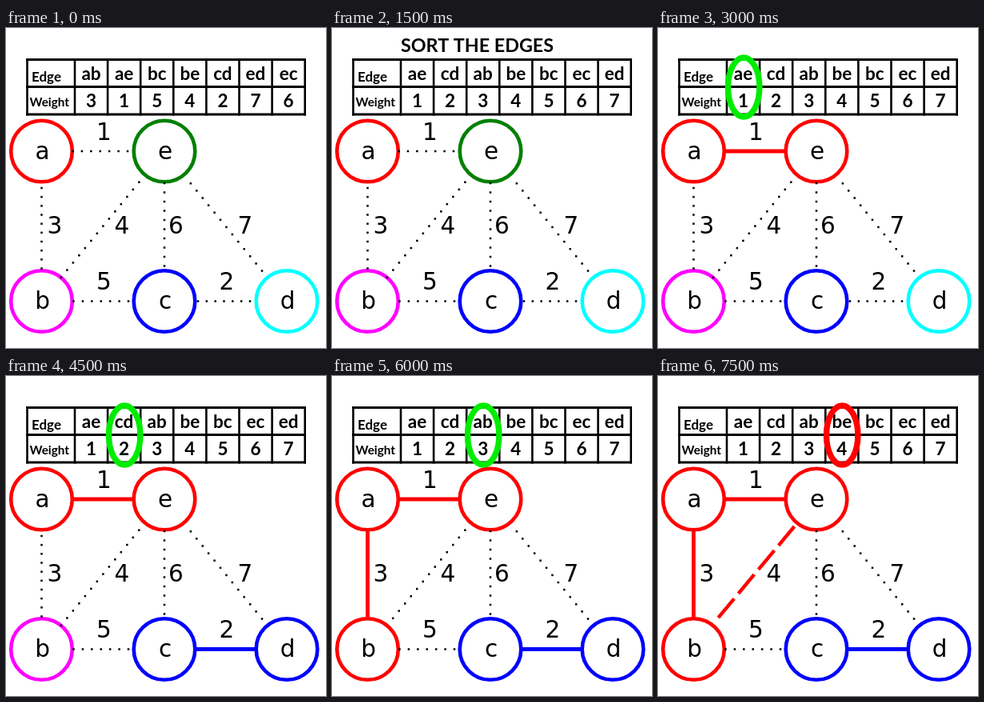
Animation of 400 by 400 pixels, one loop 8 s. Source, as an HTML page with a canvas:

```html
<!DOCTYPE html>
<html lang="en">
<head>
<meta charset="utf-8">
<title>Sorting edges by weight</title>
<style>
html, body { margin: 0; width: 100%; height: 100%; overflow: hidden; background: #fff; }
canvas { display: block; }
</style>
</head>
<body>
<canvas id="stage" width="400" height="400"></canvas>
<script>
const ctx = document.getElementById('stage').getContext('2d');
const LOOP = 8000, STEP = 1500;
const RED = '#f00', BLUE = '#00f', LIME = '#00ec00';
const TABLE_FONT = 'Lato, sans-serif';
const GRAPH_FONT = '"DejaVu Sans", sans-serif';

const weights = { ab: 3, ae: 1, bc: 5, be: 4, cd: 2, ed: 7, ec: 6 };
const unsorted = Object.keys(weights);
const sorted = [...unsorted].sort((p, q) => weights[p] - weights[q]);

const nodes = {
  a: { x: 44.5, y: 154, color: RED },
  e: { x: 198, y: 154, color: '#008000' },
  b: { x: 44.5, y: 341.5, color: '#f0f' },
  c: { x: 198, y: 341.5, color: BLUE },
  d: { x: 351, y: 341.5, color: '#0ff' }
};

// Distance of the first and last dot from the node centres
const dotted = {
  ae: [39, 46], ab: [46, 41], bc: [40, 45], cd: [42, 46],
  be: [38.5, 50], ec: [40, 44], ed: [52, 49]
};

const labels = {
  ae: [122.5, 140], ab: [61, 257], be: [145, 257], ec: [212.5, 257],
  ed: [299, 257], bc: [122.5, 327], cd: [276, 327]
};

function text(str, x, y, font, align = 'center') {
  ctx.font = font;
  ctx.textAlign = align;
  ctx.fillStyle = '#000';
  ctx.fillText(str, x, y);
}

function line(x1, y1, x2, y2, color, width) {
  ctx.strokeStyle = color;
  ctx.lineWidth = width;
  ctx.beginPath();
  ctx.moveTo(x1, y1);
  ctx.lineTo(x2, y2);
  ctx.stroke();
}

function ellipse(x, y, rx, ry, color, width) {
  ctx.strokeStyle = color;
  ctx.lineWidth = width;
  ctx.beginPath();
  ctx.ellipse(x, y, rx, ry, 0, 0, Math.PI * 2);
  ctx.stroke();
}

// Point on the edge p-q, at the given distance from p
function along(p, q, dist) {
  const k = dist / Math.hypot(q.x - p.x, q.y - p.y);
  return [p.x + (q.x - p.x) * k, p.y + (q.y - p.y) * k];
}

function drawDots(edge, step) {
  const [p, q] = [...edge].map(n => nodes[n]);
  let [start, end] = dotted[edge];
  if (edge === 'be' && step >= 4) start = 50;
  const span = Math.hypot(q.x - p.x, q.y - p.y) - start - end;
  const count = Math.round(span / 11.7);
  ctx.fillStyle = '#000';
  for (let i = 0; i <= count; i++) {
    const [x, y] = along(p, q, start + span * i / count);
    ctx.fillRect(x - 1.25, y - 1.25, 2.5, 2.5);
  }
}

function drawSolid(edge, color) {
  const [p, q] = [...edge].map(n => nodes[n]);
  line(...along(p, q, 38), ...along(q, p, 38), color, 4.8);
}

function drawTable(order, step) {
  const columns = [26.5, ...Array.from({ length: 8 }, (_, i) => 86 + 41.1 * i)];
  columns.forEach(x => line(x, 38, x, 109.5, '#000', 2.6));
  [39.5, 73.5, 108].forEach(y => line(25.2, y, 375, y, '#000', 2.8));
  text('Edge', 32, 66.5, 'bold 17px ' + TABLE_FONT, 'left');
  text('Weight', 29.5, 97.5, 'bold 15.3px ' + TABLE_FONT, 'left');
  order.forEach((edge, i) => {
    const x = 106.5 + 41.1 * i;
    text(edge, x, 65, 'bold 22.5px ' + TABLE_FONT);
    text(weights[edge], x, 99, 'bold 22.5px ' + TABLE_FONT);
  });
  if (step === 1) text('SORT THE EDGES', 181.5, 30, 'bold 23.3px ' + TABLE_FONT);
  if (step >= 2) {
    ellipse(107.2 + 41 * (step - 2), 74, 19.7, 37, step === 5 ? RED : LIME, 7.4);
  }
}

function drawGraph(step) {
  const solid = {};
  const colors = {};
  for (const n in nodes) colors[n] = nodes[n].color;
  if (step >= 2) { solid.ae = RED; colors.e = RED; }
  if (step >= 3) { solid.cd = BLUE; colors.d = BLUE; }
  if (step >= 4) { solid.ab = RED; colors.b = RED; }

  for (const n in nodes) {
    const { x, y } = nodes[n];
    ellipse(x, y, 38.3, 38.3, colors[n], 4.6);
    text(n, x + 1, y + 9.5, '29.5px ' + GRAPH_FONT);
  }
  for (const edge in weights) {
    if (solid[edge]) drawSolid(edge, solid[edge]);
    else if (edge === 'be' && step === 5) {
      ctx.setLineDash([31, 8.2]);
      line(170.5, 188, 75, 302.5, RED, 4.4);
      ctx.setLineDash([]);
    } else drawDots(edge, step);
    text(weights[edge], ...labels[edge], '29.5px ' + GRAPH_FONT);
  }
}

function draw(time) {
  const step = Math.floor((time % LOOP) / STEP);
  ctx.fillStyle = '#fff';
  ctx.fillRect(0, 0, 400, 400);
  drawGraph(step);
  drawTable(step ? sorted : unsorted, step);
}

const began = performance.now();
function tick() {
  draw(performance.now() - began);
  requestAnimationFrame(tick);
}
tick();
</script>
</body>
</html>
```
